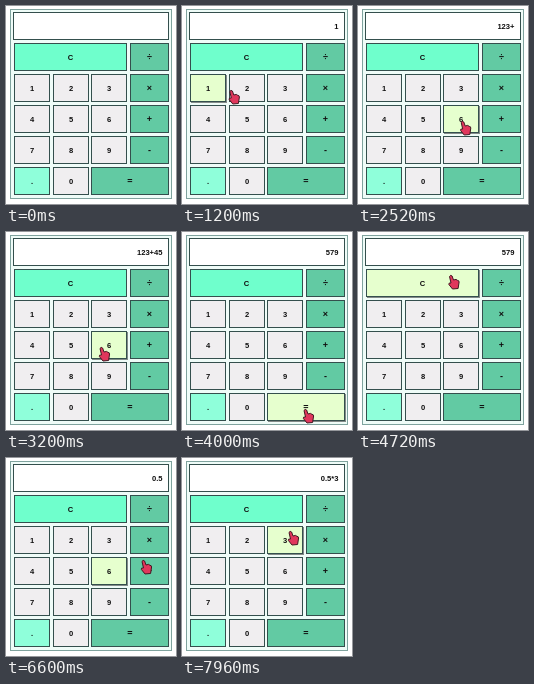
These frames come from a looping animation (170 px wide and 198 px high, 8000 ms). An HTML page with a canvas:

```html
<!DOCTYPE html>
<html lang="en">
<head>
<meta charset="utf-8">
<title>Calculator</title>
<style>
  html, body { margin: 0; width: 100%; height: 100%; overflow: hidden; background: #fff; }
  canvas { display: block; width: 170px; height: 198px; }
</style>
</head>
<body>
<canvas id="stage" width="170" height="198"></canvas>
<script>
const ctx = document.getElementById('stage').getContext('2d');
const LOOP = 8000;
const SPEED = 0.8;       // pointer pixels per ms
const PRESS_DELAY = 180; // from arrival to press, ms
const HOVER_LAG = 20;
const HOTSPOT = 3;
const INK = '#344f4d';
const LABEL = '#111';
const LIT = '#e6ffce';
const DIGIT = '#f0eef0';
const OPERATOR = '#62caa3';
const FONT = '"Liberation Sans", Arial, sans-serif';

const columnX = col => Math.round(8 + 38.67 * col);
const keys = [];

function addKey(label, col, row, color, span = 1) {
  const x = columnX(col);
  const last = col + span - 1;
  const right = last === 3 ? 163 : columnX(last) + 36;
  const size = color === OPERATOR ? 9 : 7.6;
  keys.push({ label, color, size, x, y: 37 + 31 * row, w: right - x, h: 28 });
}

addKey('C', 0, 0, '#6fffcc', 3);
['÷', '×', '+', '-'].forEach((label, i) => addKey(label, 3, i, OPERATOR));
for (let n = 0; n < 9; n++) addKey(String(n + 1), n % 3, 1 + Math.floor(n / 3), DIGIT);
addKey('.', 0, 4, '#8fffda');
addKey('0', 1, 4, DIGIT);
addKey('=', 2, 4, OPERATOR, 2);

// A visit moves the pointer to a key, then presses it unless it only hovers.
function visit(label, at, { dx = -1, dy = 2, press = true } = {}) {
  const key = keys.find(k => k.label === label);
  return { label, at, press, x: key.x + key.w / 2 + dx, y: key.y + key.h / 2 + dy };
}

const visits = [
  visit('1', 1080), visit('2', 1400), visit('3', 1720), visit('+', 2360),
  visit('4', 2800), visit('5', 3040), visit('6', 3360, { dx: -8 }), visit('=', 4000),
  visit('C', 4880, { dx: 28, dy: -8 }), visit('0', 5280), visit('.', 5720), visit('5', 6120),
  visit('+', 6788, { dy: -12, press: false }), visit('×', 7280),
  visit('3', 7960, { dx: 5, dy: -9 })
];

let from = { x: 58, y: 202 };
for (const v of visits) {
  v.from = from;
  v.arrive = v.at - PRESS_DELAY;
  v.depart = v.arrive - Math.hypot(v.x - from.x, v.y - from.y) / SPEED;
  from = v;
}

function pointerAt(t) {
  const v = visits.filter(v => v.depart <= t).pop();
  if (!v) return null;
  const k = Math.min(1, (t - v.depart) / (v.arrive - v.depart));
  return { x: v.from.x + (v.x - v.from.x) * k, y: v.from.y + (v.y - v.from.y) * k };
}

function enter(text, label) {
  if (label === 'C') return '';
  if (label === '=') return String(text.split('+').reduce((sum, n) => sum + Number(n), 0));
  if (label === '.') return text + '.';
  return text + (label === '×' ? '*' : label);
}

function readoutAt(t) {
  return visits.filter(v => v.press && v.at <= t).reduce((text, v) => enter(text, v.label), '');
}

function contains(key, p) {
  if (!p) return false;
  const x = p.x - HOTSPOT;
  return x >= key.x && x <= key.x + key.w && p.y >= key.y && p.y <= key.y + key.h;
}

function box(x, y, w, h, fill, stroke = INK) {
  ctx.fillStyle = stroke;
  ctx.fillRect(x, y, w, h);
  ctx.fillStyle = fill;
  ctx.fillRect(x + 1, y + 1, w - 2, h - 2);
}

function text(value, x, y, align, size) {
  ctx.font = `bold ${size}px ${FONT}`;
  ctx.textAlign = align;
  ctx.fillStyle = LABEL;
  ctx.fillText(value, x, y);
}

function drawKey(key, lit) {
  if (lit) {
    ctx.fillStyle = 'rgba(0, 0, 0, .45)';
    ctx.fillRect(key.x + 1, key.y + 1, key.w, key.h);
  }
  box(key.x, key.y, key.w, key.h, lit ? LIT : key.color);
  text(key.label, key.x + key.w / 2, key.y + key.h / 2 + key.size * 0.36, 'center', key.size);
}

function drawHand({ x, y }) {
  ctx.save();
  ctx.translate(x - 2, y);
  ctx.beginPath();
  ctx.moveTo(1, 1.5);
  ctx.quadraticCurveTo(2, -.5, 3.6, 1);
  ctx.lineTo(5, 5);
  ctx.quadraticCurveTo(8, 3.6, 9, 5.4);
  ctx.quadraticCurveTo(10.5, 5.2, 10.6, 7);
  ctx.lineTo(9.6, 13.5);
  ctx.lineTo(4, 14);
  ctx.lineTo(.4, 9.5);
  ctx.quadraticCurveTo(-.2, 7.5, 2.5, 8);
  ctx.closePath();
  ctx.fillStyle = '#e0375c';
  ctx.fill();
  ctx.strokeStyle = '#421822';
  ctx.lineJoin = 'round';
  ctx.stroke();
  ctx.restore();
}

function draw(t) {
  ctx.fillStyle = '#fff';
  ctx.fillRect(0, 0, 170, 198);
  box(4, 3, 162, 190, '#effcf8', '#7fa39e');
  box(7, 6, 156, 28, '#fff');
  const hover = pointerAt(t - HOVER_LAG);
  keys.forEach(key => drawKey(key, contains(key, hover)));
  text(readoutAt(t), 156.5, 22.7, 'right', 7.6);
  const pointer = pointerAt(t);
  if (pointer) drawHand(pointer);
}

const start = performance.now();
function frame() {
  draw((performance.now() - start) % LOOP);
  requestAnimationFrame(frame);
}
frame();
</script>
</body>
</html>
```
